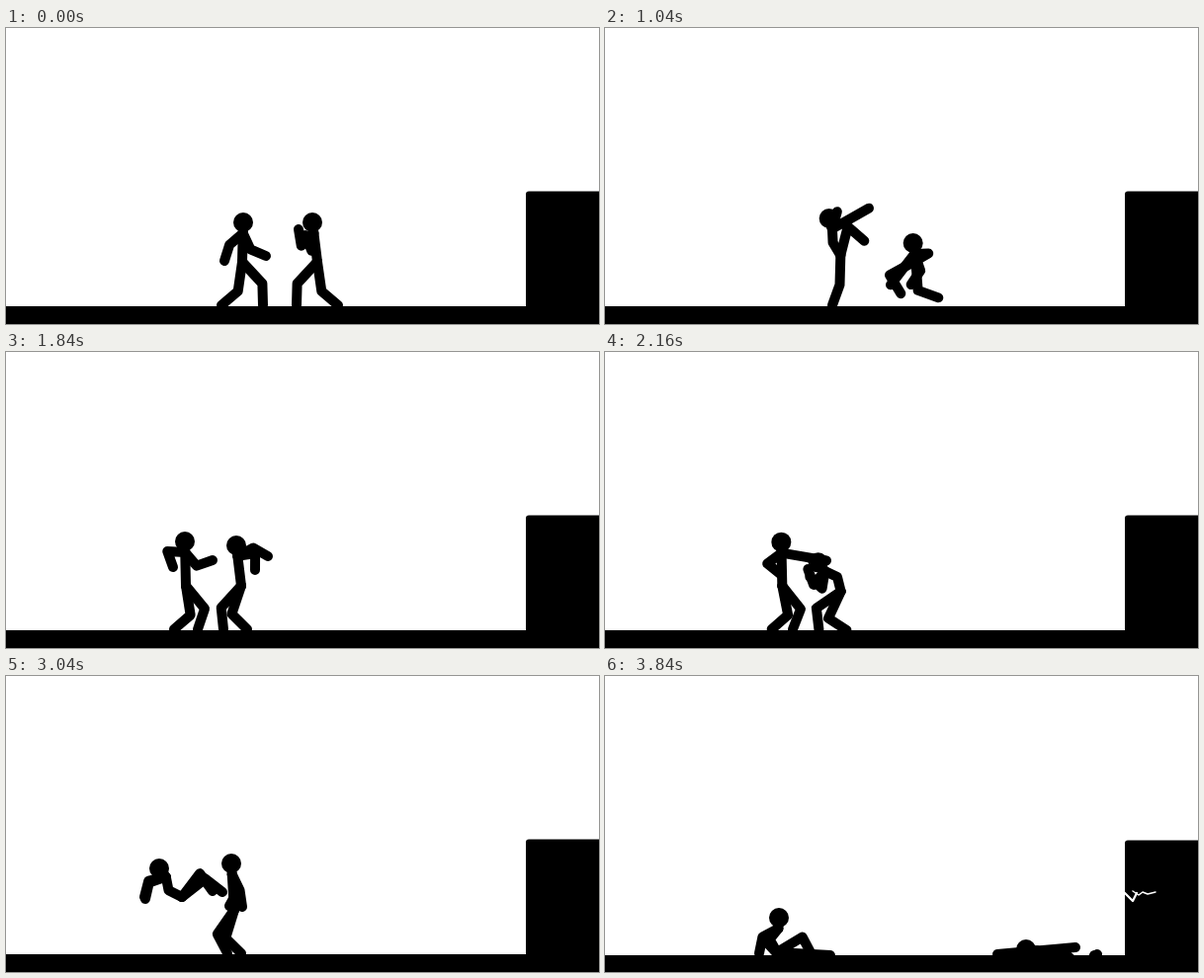
Animation, 600 px wide and 300 px high, one loop 4480 ms. Source, as an HTML page with a canvas:

```html
<!DOCTYPE html>
<html lang="en">
<head>
<meta charset="utf-8">
<title>Stick fight</title>
<style>
html, body { margin: 0; width: 100%; height: 100%; overflow: hidden; background: #fff; }
canvas { display: block; }
</style>
</head>
<body>
<canvas id="stage" width="600" height="300"></canvas>
<script>
const ctx = document.getElementById('stage').getContext('2d');
const LOOP = 4480, STEP = 80, FIRST = 80, LAST = 3840;
const GROUND = 282, CRACK_TIME = 3520;
const PARTS = ['hip', 'head', 'handA', 'handB', 'footA', 'footB'];
const SPINE = [15, 14], ARM = [18, 17], LEG = [30, 22];

// Upright body over x; any part can be overridden after it.
const stand = (x, lean, stride, height = 40) => ({
  hip: [x, 237], head: [x + lean, 237 - height],
  footA: [x - stride, 281], footB: [x + stride, 281]
});

// Key poses may name only some parts; each part moves between its own keys.
const kicker = {
  facing: 1,
  keys: {
    80: { ...stand(239, 1, 21), handA: [221, 236], handB: [263, 231] },
    320: { handB: [282, 205] },
    720: { hip: [250, 224], head: [251, 186], handA: [215, 208], handB: [279, 172], footA: [248, 281], footB: [264, 215] },
    960: { hip: [240, 227], head: [225, 191], footB: [269, 183] },
    1200: stand(235, -5, 14),
    1440: { hip: [228, 235], head: [226, 196], handA: [247, 195], handB: [252, 196], footA: [228, 277], footB: [250, 281] },
    1640: { hip: [198, 236], handA: [169, 210] },
    1840: { ...stand(182, -1, 12, 45), handA: [169, 218], handB: [209, 211] },
    2080: { handB: [229, 208] },
    2320: stand(178, -1, 10, 44),
    2560: { hip: [177, 231], head: [188, 193], handA: [188, 234], handB: [199, 229], footA: [189, 280], footB: [191, 281] },
    3040: { hip: [178, 224], head: [155, 195], handA: [141, 226], handB: [140, 224], footA: [209, 218], footB: [219, 219] },
    3120: { hip: [182, 224], footA: [232, 212], footB: [234, 216] },
    3360: { hip: [160, 279], head: [121, 278], handA: [109, 281], handB: [151, 281], footA: [196, 281], footB: [207, 281] },
    3840: { hip: [174, 280], head: [176, 245], handA: [156, 281], handB: [174, 281], footA: [210, 284], footB: [228, 283] }
  }
};

const tackler = {
  facing: -1,
  keys: {
    80: { ...stand(315, -5, 21), handA: [303, 210], handB: [296, 204] },
    320: { hip: [320, 237], head: [320, 197] },
    720: { hip: [322, 231], head: [310, 194], handA: [287, 223], handB: [335, 220], footA: [280, 203], footB: [336, 280] },
    960: { hip: [320, 235], head: [327, 196], footA: [300, 281] },
    1200: { hip: [303, 238], head: [281, 262], handA: [290, 279], handB: [297, 280], footB: [338, 270] },
    1440: { hip: [285, 235], head: [283, 272], handA: [297, 279], handB: [284, 279], footA: [296, 210], footB: [253, 196] },
    1640: { hip: [257, 236], head: [270, 208], footA: [233, 268], footB: [264, 281] },
    1840: { ...stand(238, -5, 6, 41), footA: [220, 281], handA: [265, 207], handB: [252, 221] },
    2080: { hip: [240, 244], head: [222, 211], handA: [212, 214], handB: [212, 220] },
    2320: { hip: [236, 240], head: [203, 218], handA: [192, 232], handB: [198, 244] },
    2560: { hip: [231, 237], head: [201, 220], handA: [201, 256], handB: [223, 256], footA: [212, 282], footB: [245, 283] },
    3040: { ...stand(231, -3, 7, 47), handA: [226, 233], handB: [239, 234] },
    3120: { ...stand(242, -14, 14), handA: [207, 210], handB: [209, 219] },
    3440: { hip: [516, 228], head: [497, 192], handA: [475, 202], handB: [477, 213], footA: [478, 235], footB: [482, 250] },
    3520: { hip: [514, 240], head: [508, 203] },
    3840: { hip: [466, 282], head: [426, 277], handA: [397, 282], handB: [476, 275], footA: [498, 282], footB: [495, 283] }
  }
};

const mix = (a, b, u) => a.map((v, i) => v + (b[i] - v) * u);

function partAt(keys, part, time) {
  const times = Object.keys(keys).map(Number).filter(t => keys[t][part]);
  const next = times.find(t => t >= time);
  const prev = times.findLast(t => t <= time);
  const u = next === prev ? 0 : (time - prev) / (next - prev);
  return mix(keys[prev][part], keys[next][part], u);
}

// Two-bone limb from start to end; it stretches when the end is out of reach.
function bend(start, end, [upper, lower], side) {
  const dx = end[0] - start[0], dy = end[1] - start[1];
  const span = Math.max(1, Math.hypot(dx, dy));
  const scale = Math.max(1, span / (upper + lower));
  const a = upper * scale, b = lower * scale;
  const along = Math.max(-a, Math.min(a, (a * a - b * b + span * span) / (2 * span)));
  const out = side * Math.sqrt(a * a - along * along);
  const joint = [
    start[0] + (dx * along - dy * out) / span,
    start[1] + (dy * along + dx * out) / span
  ];
  return [start, joint, end];
}

function line(points, width, color) {
  ctx.strokeStyle = color;
  ctx.lineWidth = width;
  ctx.beginPath();
  points.forEach(([x, y]) => ctx.lineTo(x, y));
  ctx.stroke();
}

function drawFigure({ facing, keys }, time) {
  const body = {};
  PARTS.forEach(part => body[part] = partAt(keys, part, time));
  const { hip, head, handA, handB, footA, footB } = body;
  const height = Math.hypot(hip[0] - head[0], hip[1] - head[1]);
  const neck = mix(head, hip, Math.min(1, 11 / height));

  const limbs = [
    [...bend(hip, neck, SPINE, -facing), head],
    bend(neck, handA, ARM, facing),
    bend(neck, handB, ARM, facing),
    bend(hip, footA, LEG, -facing),
    bend(hip, footB, LEG, -facing)
  ];
  limbs.forEach(points => line(points, 10, '#000'));
  ctx.beginPath();
  ctx.arc(...head, 10, 0, Math.PI * 2);
  ctx.fill();
}

// Heavy hits jolt the scenery; it sinks back a pixel per step.
function shakeAt(time) {
  const jolt = (at, size) => time < at ? 0 : Math.max(0, size - (time - at) / STEP);
  const rest = time >= 3440 ? 1 : 0;
  return Math.max(rest, jolt(2240, 3), jolt(2560, 5), jolt(3120, 4));
}

function drawScenery(time) {
  const shake = shakeAt(time);
  ctx.fillStyle = '#000';
  ctx.fillRect(0, GROUND + shake, 600, 20);
  ctx.beginPath();
  ctx.roundRect(526, 165.5 + shake, 90, 150, 3);
  ctx.fill();
}

function drawCrack() {
  line([[525, 219], [534, 228], [538, 220]], 2.2, '#fff');
  line([[534, 218], [540, 222], [544, 219], [549, 221], [557, 219]], 1.5, '#fff');
}

function render(now) {
  const stepped = Math.floor((now % LOOP) / STEP) * STEP;
  const time = Math.min(LAST, Math.max(FIRST, stepped));
  ctx.fillStyle = '#fff';
  ctx.fillRect(0, 0, 600, 300);
  ctx.lineCap = ctx.lineJoin = 'round';
  drawScenery(time);
  drawFigure(kicker, time);
  drawFigure(tackler, time);
  if (time >= CRACK_TIME) drawCrack();
}

const start = performance.now();
function tick() {
  render(performance.now() - start);
  requestAnimationFrame(tick);
}
tick();
</script>
</body>
</html>
```
